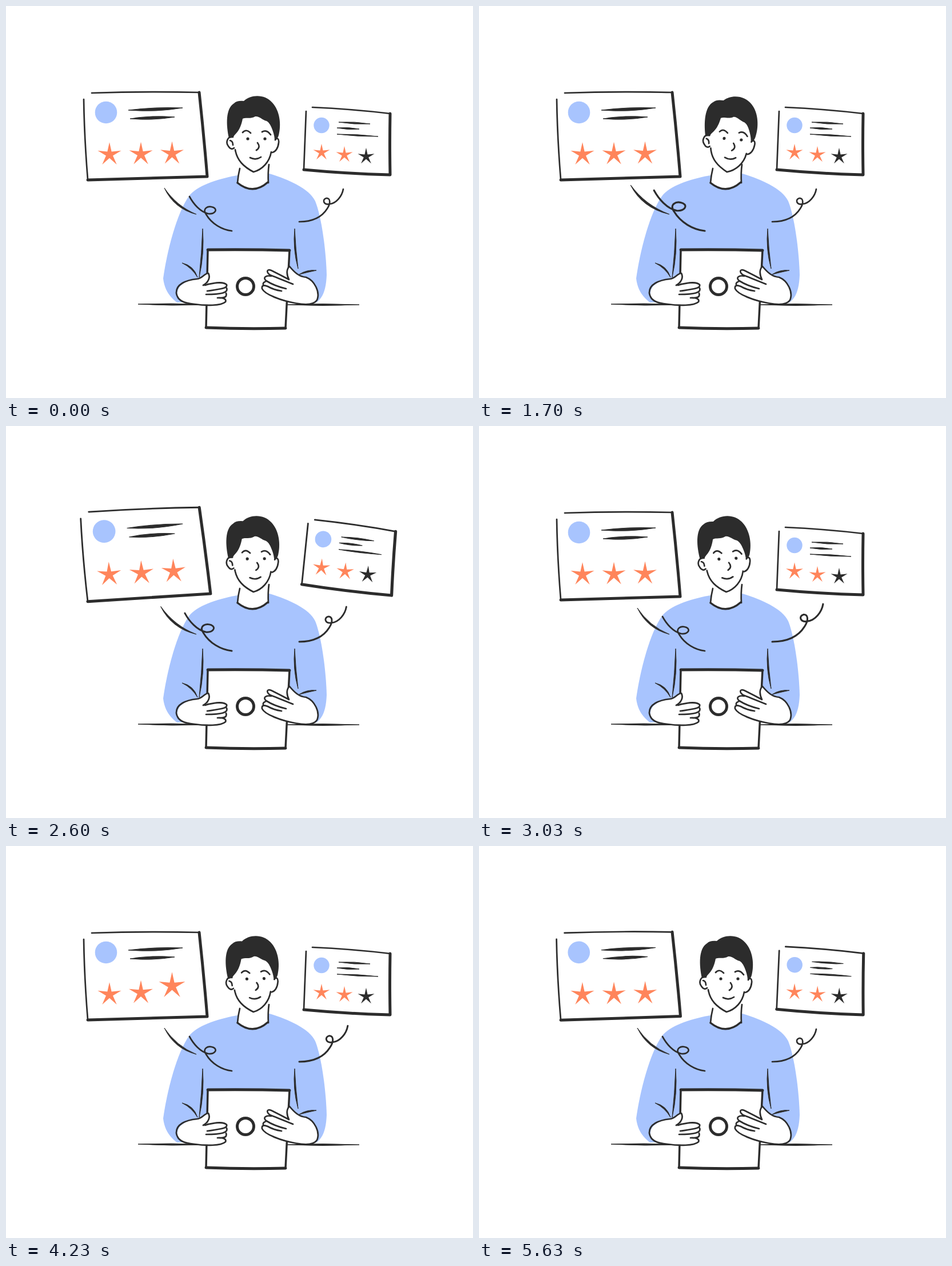
These frames come from a looping animation (817 px wide and 685 px high, 5.71 s). An HTML page:

```html
<!DOCTYPE html>
<html lang="en">
<head>
<meta charset="utf-8">
<title>Reviews</title>
<style>
  html, body { margin: 0; width: 100%; height: 100%; overflow: hidden; background: #fff; }
  svg { display: block; width: 817px; height: 685px; }
  .line { fill: none; stroke: #2c2c2c; stroke-width: 2.7; stroke-linecap: round; stroke-linejoin: round; }
  .medium { stroke-width: 3.5; }
  .heavy { stroke-width: 5; }
  .dark { fill: #2c2c2c; }
  .blue { fill: #a8c4fe; }
  .orange { fill: #ff855b; }
  .white { fill: #fff; }
</style>
</head>
<body>
<svg viewBox="0 0 817 685">
  <path class="blue" d="M405 296C365 303 334 315 321 331C298 362 281 432 275 476C277 496 287 509 299 518H543C556 509 560 492 561 470C560 428 552 368 541 341C531 320 497 304 461 293Z"/>

  <g id="neck">
    <path class="white" d="M409 275L404 309Q432 331 459 308L461 270Z"/>
    <path class="line" d="M409 284Q406 296 405 309M460 277Q458 292 459 309"/>
    <path class="line medium" d="M405 309Q432 331 458 308"/>
  </g>

  <g id="head">
    <path class="white" d="M398 210L388 232L392 247L399 250C403 272 415 282 433 290C449 286 462 272 465 256L476 246L477 231L462 200L430 190Z"/>
    <path class="line" d="M397 229C387 227 384 239 389 245C392 250 396 251 399 248M392 235Q397 236 397 243M401 251C404 270 416 281 433 290C448 286 461 273 464 255M471 234C474 229 478 232 477 239C476 249 471 255 466 256"/>
    <path class="dark" d="M390 231C385 208 384 179 399 170Q404 165 416 166C429 154 453 154 466 169C479 183 482 207 477 226Q475 233 470 235Q470 228 467 219C464 210 461 204 456 201C448 199 443 192 436 193C428 198 420 194 414 197C412 207 409 215 404 221Q399 226 397 230Z"/>
    <path class="line" d="M414 221Q420 214 428 222M448 220Q456 215 463 225M440 239Q446 247 438 252M427 265Q437 270 446 264"/>
    <circle class="dark" cx="423" cy="232" r="2.6"/>
    <circle class="dark" cx="453" cy="232" r="2.6"/>
  </g>

  <g id="sleeves" class="dark"></g>

  <path class="white" d="M353 426L496 427L489 563L350 562Z"/>
  <path class="line medium" d="M353 427L350 562M496 427L489 563"/>
  <path class="line heavy" d="M353 426Q425 425 496 427M350 562Q420 565 489 563"/>
  <circle class="line heavy" cx="419" cy="490" r="14.5"/>

  <g id="desk" class="dark"></g>

  <path class="white" d="M335 477Q348 467 355 467Q357 478 352 486Q376 480 386 488Q388 497 385 516C372 524 326 523 308 517C294 508 295 482 335 477Z"/>
  <path class="line" d="M345 488C354 483 358 474 354 467C347 467 344 476 334 477C315 479 297 486 298 502C300 514 309 519 330 521C350 524 376 524 384 517C386 512 380 509 370 510M348 488C362 484 380 481 386 487C388 494 372 495 352 498M386 493C389 501 377 504 350 504M385 502Q388 511 372 510"/>
  <path class="white" d="M456 463Q462 458 494 477Q490 461 496 455Q510 472 525 474C540 482 550 500 544 514C537 524 518 522 505 519C482 515 451 505 448 493Q447 486 453 484Q450 475 460 472Z"/>
  <path class="line" d="M502 486C490 481 477 476 462 470C455 465 456 459 464 462Q478 469 495 478C490 468 491 459 496 455C505 466 513 473 525 474C540 480 550 500 544 514C538 523 520 522 505 519C484 515 453 505 448 494C447 488 451 487 458 490Q468 496 482 498M464 472C454 470 449 475 455 480Q469 489 490 494M455 481Q449 483 450 487"/>

  <g id="cards"></g>

  <g id="tailA" class="dark"></g>
  <path id="tailB" class="line" d="M321 333C328 346 340 360 354 363C365 364 371 356 363 352C353 348 343 354 350 364C360 381 378 391 395 393"/>
  <path id="tailC" class="line" d="M590 320C588 332 578 345 566 346C555 348 553 338 560 336C568 335 568 345 562 354C552 370 535 377 513 377"/>
</svg>
<script>
const LOOP = 5710;
const $ = id => document.getElementById(id);

// Pen stroke that is thin at both ends; bend pushes its middle sideways.
function brush(x1, y1, x2, y2, width, bend = 0) {
  const len = Math.hypot(x2 - x1, y2 - y1);
  const nx = (y1 - y2) / len, ny = (x2 - x1) / len;
  const mid = k => `${(x1 + x2) / 2 + nx * k} ${(y1 + y2) / 2 + ny * k}`;
  return `<path d="M${x1} ${y1}Q${mid(bend + width)} ${x2} ${y2}Q${mid(bend - width)} ${x1} ${y1}Z" stroke="#2c2c2c"/>`;
}

function star(r) {
  const points = Array.from({ length: 10 }, (_, i) => {
    const a = (i / 5 - 0.5) * Math.PI, d = i % 2 ? r * 0.29 : r;
    return `${(d * Math.cos(a)).toFixed(1)},${(d * Math.sin(a)).toFixed(1)}`;
  });
  return `<polygon points="${points.join(' ')}"/>`;
}

const cards = [
  {
    pivot: [189, 268], turn: -3.9, grow: 0.058, size: 21.6, jump: 13.5, second: 3000,
    face: 'M136 152L339 151L352 298L143 304Z',
    thin: 'M150 152Q240 149 338 151M143 303Q137 230 136 163',
    bold: 'M338 151Q346 225 352 298L143 304',
    dot: [175, 186, 19.3],
    text: [[214, 182, 309, 178, 5, 1], [217, 197, 295, 194, 5]],
    stars: [[181, 259.5], [236, 259], [290.5, 258]], hops: [760, 1000, 1240]
  },
  {
    pivot: [643, 315], turn: 7, grow: 0.09, size: 15.2, jump: 7.5, second: 2480,
    face: 'M525 178L673 188L672 295L521 286Z',
    thin: 'M536 177Q605 180 672 188M521 286Q523 235 525 184',
    bold: 'M672 188Q671 240 672 295Q595 293 521 286',
    dot: [552, 208.5, 13.7],
    text: [[582, 203, 637, 206, 3], [579, 213, 618, 215, 3], [579, 224, 651, 228, 2.4]],
    stars: [[552, 256], [592, 260], [630, 263]], hops: [760, 1000]
  }
];

$('cards').innerHTML = cards.map(c => `<g>
  <path class="white" d="${c.face}"/>
  <path class="line" d="${c.thin}"/>
  <path class="line heavy" d="${c.bold}"/>
  <circle class="blue" cx="${c.dot[0]}" cy="${c.dot[1]}" r="${c.dot[2]}"/>
  <g class="dark">${c.text.map(l => brush(...l)).join('')}</g>
  ${c.stars.map((_, i) => `<g class="star ${i < c.hops.length ? 'orange' : 'dark'}">${star(c.size)}</g>`).join('')}
</g>`).join('');
cards.forEach((c, i) => {
  c.node = $('cards').children[i];
  c.starNodes = c.node.querySelectorAll('.star');
});

$('sleeves').innerHTML = brush(344, 389, 338, 474, 2.6, -4) + brush(308, 449, 335, 474, 2.6, -8)
  + brush(505, 389, 511, 459, 2.6, 4) + brush(543, 462, 513, 469, 2.6, 3);
$('desk').innerHTML = brush(231, 521, 350, 522, 3) + brush(490, 522, 618, 522, 3);
$('tailA').innerHTML = brush(277, 318, 333, 364, 3, 14);

const ease = (t, from, to) => {
  const u = Math.min(1, Math.max(0, (t - from) / (to - from)));
  return u * u * (3 - 2 * u);
};
const pulse = (t, start, span) => {
  const u = (t - start) / span;
  return u > 0 && u < 1 ? Math.sin(Math.PI * u) ** 2 : 0;
};
const stretch = (id, x, y, sx, sy) =>
  $(id).setAttribute('transform', `translate(${x} ${y}) scale(${sx} ${sy}) translate(${-x} ${-y})`);

function draw(t) {
  const tilt = 5 * ease(t, 0, 620) - 7.7 * ease(t, 1800, 3000) + 2.7 * ease(t, 3630, 4830);
  $('head').setAttribute('transform', `rotate(${tilt} 433 300)`);

  const swell = pulse(t, 1810, 1060) + pulse(t, 4640, 1060);
  for (const c of cards) {
    const [px, py] = c.pivot;
    c.node.setAttribute('transform',
      `translate(${px} ${py}) rotate(${c.turn * swell}) scale(${1 + c.grow * swell}) translate(${-px} ${-py})`);
    c.stars.forEach(([x, y], i) => {
      const start = c.hops[i] - 320;
      const hop = i < c.hops.length ? pulse(t, start, 640) + pulse(t, start + c.second, 640) : 0;
      c.starNodes[i].setAttribute('transform', `translate(${x} ${y - c.jump * hop}) scale(${1 + 0.12 * hop})`);
    });
  }

  const back = ease(t, 2250, 3000);
  const a = ease(t, 0, 700) - back;
  const b = ease(t, 150, 1300) - back;
  const c = back - ease(t, 3800, 4900);
  stretch('tailA', 333, 364, 1 + 0.21 * a, 1 + 0.11 * a);
  stretch('tailB', 395, 393, 1 + 0.2 * b, 1 + 0.18 * b);
  stretch('tailC', 513, 377, 1 + 0.155 * c, 1 + 0.155 * c);
}

const begin = performance.now();
function tick() {
  draw((performance.now() - begin) % LOOP);
  requestAnimationFrame(tick);
}
tick();
</script>
</body>
</html>
```
